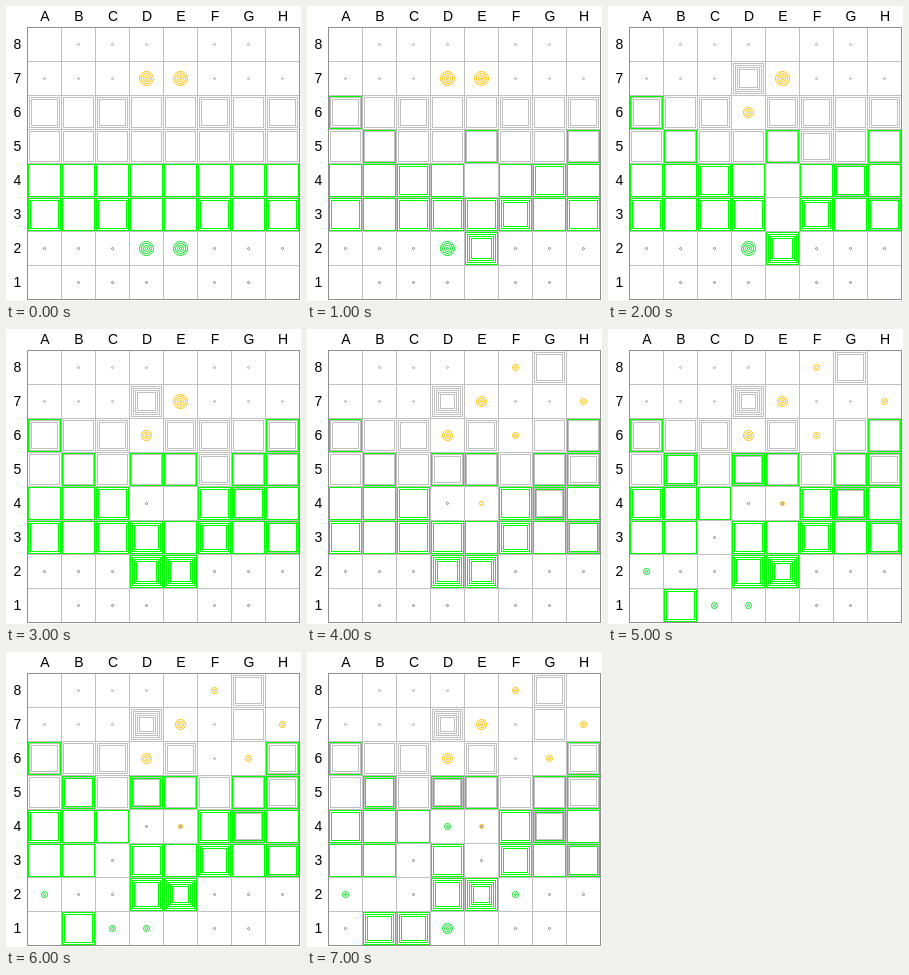
Write an HTML page with a canvas that moves like this. It is 295 px wide and 295 px high and loops after 8000 ms.

```html
<!DOCTYPE html>
<html lang="en">
<head>
<meta charset="utf-8">
<title>Chess coverage</title>
<style>
  html, body { margin: 0; width: 100%; height: 100%; overflow: hidden; background: #fff; }
  canvas { display: block; }
</style>
</head>
<body>
<canvas id="stage" width="295" height="295"></canvas>
<script>
const ctx = document.getElementById('stage').getContext('2d');
const ORIGIN = 21, CELL = 34, STEP_MS = 1000;
const GRID = '#c0c0c0', BORDER = '#909090';
const MOVES = ['e2e4', 'd7d6', 'd2d4', 'g8f6', 'b1c3', 'g7g6', 'c1e3'];
const SIDES = {
  white: { box: '#00ff00', ring: '#00e020', dot: '#808080', inset: 1 },
  black: { box: '#c0c0c0', ring: '#ffbf00', dot: '#a8a8a8', inset: 2 }
};

const STRAIGHT = [[1, 0], [-1, 0], [0, 1], [0, -1]];
const DIAGONAL = [[1, 1], [1, -1], [-1, 1], [-1, -1]];
const ALL = STRAIGHT.concat(DIAGONAL);
const JUMPS = [[1, 2], [2, 1], [-1, 2], [-2, 1], [1, -2], [2, -1], [-1, -2], [-2, -1]];
const REACH = {
  r: [STRAIGHT, 7], b: [DIAGONAL, 7], q: [ALL, 7], k: [ALL, 1], n: [JUMPS, 1]
};

const inside = (x, y) => x >= 0 && x < 8 && y >= 0 && y < 8;
const sideOf = piece => piece === piece.toUpperCase() ? 'white' : 'black';
const parse = name => [name.charCodeAt(0) - 97, 8 - name[1]];

function startBoard() {
  const empty = () => Array(8).fill('');
  return [
    [...'rnbqkbnr'], [...'pppppppp'], empty(), empty(),
    empty(), empty(), [...'PPPPPPPP'], [...'RNBQKBNR']
  ];
}

// Counts, per square, the moves into it, its protectors and its attackers.
function coverage(board, passed) {
  const cells = board.map(row => row.map(() => ({ white: 0, black: 0, guard: 0, threat: 0 })));

  function touch(x, y, side) {
    const target = board[y][x], cell = cells[y][x];
    if (!target) cell[side]++;
    else if (sideOf(target) !== side) cell.threat++;
    else if (target.toLowerCase() !== 'k') cell.guard++;
  }

  function pawn(x, y, side) {
    const dir = side === 'white' ? -1 : 1;
    const home = side === 'white' ? 6 : 1;
    for (let i = 1; i <= (y === home ? 2 : 1); i++) {
      if (!inside(x, y + dir * i) || board[y + dir * i][x]) break;
      cells[y + dir * i][x][side]++;
    }
    for (const dx of [-1, 1]) {
      const nx = x + dx, ny = y + dir;
      if (!inside(nx, ny)) continue;
      const enPassant = passed && passed[0] === nx && passed[1] === ny;
      if (board[ny][nx] || enPassant) touch(nx, ny, side);
    }
  }

  board.forEach((row, y) => row.forEach((piece, x) => {
    if (!piece) return;
    const side = sideOf(piece), kind = piece.toLowerCase();
    if (kind === 'p') return pawn(x, y, side);
    const [dirs, range] = REACH[kind];
    for (const [dx, dy] of dirs) {
      for (let i = 1; i <= range; i++) {
        const nx = x + dx * i, ny = y + dy * i;
        if (!inside(nx, ny)) break;
        touch(nx, ny, side);
        if (board[ny][nx]) break;
      }
    }
  }));
  return cells;
}

function buildPositions() {
  const board = startBoard();
  const snapshot = passed => ({ board: board.map(r => r.slice()), cells: coverage(board, passed) });
  const list = [snapshot(null)];
  for (const move of MOVES) {
    const [fx, fy] = parse(move.slice(0, 2)), [tx, ty] = parse(move.slice(2));
    const piece = board[fy][fx];
    board[ty][tx] = piece;
    board[fy][fx] = '';
    const leap = piece.toLowerCase() === 'p' && Math.abs(ty - fy) === 2;
    list.push(snapshot(leap ? [fx, (fy + ty) / 2] : null));
  }
  return list;
}

function frame(x, y, size, color) {
  ctx.strokeStyle = color;
  ctx.strokeRect(x + 0.5, y + 0.5, size, size);
}

function ring(x, y, radius, color) {
  ctx.strokeStyle = color;
  ctx.beginPath();
  ctx.arc(x + 0.5, y + 0.5, radius, 0, Math.PI * 2);
  ctx.stroke();
}

function drawGrid() {
  ctx.fillStyle = '#fff';
  ctx.fillRect(0, 0, 295, 295);
  ctx.fillStyle = GRID;
  for (let i = 1; i < 8; i++) {
    const p = ORIGIN + i * CELL;
    ctx.fillRect(p, ORIGIN, 1, 8 * CELL);
    ctx.fillRect(ORIGIN, p, 8 * CELL, 1);
  }
  frame(ORIGIN, ORIGIN, 8 * CELL, BORDER);

  ctx.fillStyle = '#000';
  ctx.font = '14px "Liberation Sans", Arial, sans-serif';
  ctx.textAlign = 'center';
  for (let i = 0; i < 8; i++) {
    const middle = ORIGIN + CELL * (i + 0.5);
    ctx.fillText('ABCDEFGH'[i], middle + 1, 15);
    ctx.fillText(8 - i, 11.5, middle + 5);
  }
}

function drawCell(x, y, piece, cell) {
  const left = ORIGIN + x * CELL, top = ORIGIN + y * CELL;
  for (const side of ['black', 'white']) {
    const style = SIDES[side];
    for (let i = 0; i < cell[side]; i++) {
      const inset = style.inset + 2 * i;
      frame(left + inset, top + inset, CELL - 2 * inset, style.box);
    }
  }
  if (!piece) return;
  const cx = left + CELL / 2, cy = top + CELL / 2;
  const style = SIDES[sideOf(piece)];
  for (let i = 0; i < cell.threat; i++) ring(cx, cy, 2 + 2 * i, SIDES.black.ring);
  for (let i = 0; i < cell.guard; i++) {
    ring(cx, cy, 1 + 2 * i, cell.guard > 1 ? style.ring : style.dot);
  }
}

const positions = buildPositions();
const start = performance.now();
ctx.lineWidth = 1;

function render() {
  const elapsed = Math.max(0, performance.now() - start);
  const { board, cells } = positions[Math.floor(elapsed / STEP_MS) % positions.length];
  drawGrid();
  cells.forEach((row, y) => row.forEach((cell, x) => drawCell(x, y, board[y][x], cell)));
  requestAnimationFrame(render);
}
render();
</script>
</body>
</html>
```
